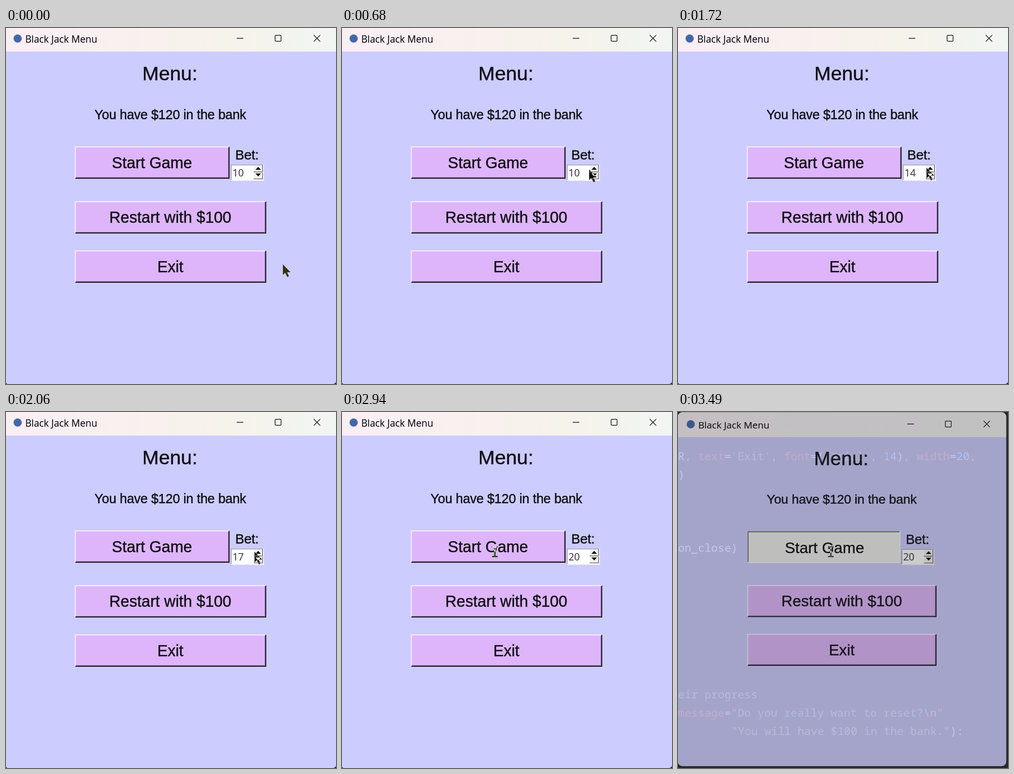
An HTML page for the animation above (3550 ms loop, 721x777 px).

```html
<!DOCTYPE html>
<html lang="en">
<head>
<meta charset="utf-8">
<title>Black Jack Menu</title>
<style>
  html, body { margin: 0; width: 100%; height: 100%; overflow: hidden; background: #292929; }
  svg { display: block; width: 721px; height: 777px; }
  text { font-family: "Liberation Sans", Arial, sans-serif; fill: #101016; stroke: #101016; stroke-width: .5; white-space: pre; }
  .mid { text-anchor: middle; }
  .ui { font-family: "Open Sans", "Noto Sans", sans-serif; stroke-width: .2; }
  #bet { fill: #3a3a4a; stroke: #3a3a4a; }
  #code text { font-family: "Noto Sans Mono", monospace; font-size: 24.15px; fill: #a9b7c6; stroke: none; }
  #code .arg { fill: #aa4926; }
  #code .str { fill: #6a8759; }
  #code .key { fill: #cc7832; }
  #code .num { fill: #6897bb; }
  #code .note { fill: #808080; }
  #pointer { mix-blend-mode: difference; }
</style>
</head>
<body>
<svg viewBox="0 0 721 777">
  <defs>
    <linearGradient id="active">
      <stop offset="0" stop-color="#faeef5"/>
      <stop offset=".35" stop-color="#f9f0ef"/>
      <stop offset=".65" stop-color="#f6f3ea"/>
      <stop offset="1" stop-color="#f1f5f3"/>
    </linearGradient>
    <linearGradient id="idle">
      <stop offset="0" stop-color="#f8eff5"/>
      <stop offset=".4" stop-color="#f4f1f5"/>
      <stop offset="1" stop-color="#f2f2f3"/>
    </linearGradient>
    <clipPath id="frame"><rect x="-3" y="-3.5" width="725.5" height="781" rx="10"/></clipPath>
  </defs>
  <rect width="721" height="777" fill="#292929"/>
  <g id="code" visibility="hidden">
    <text x="0" y="105">R<tspan class="key">, </tspan><tspan class="arg">text</tspan>=<tspan class="str">'Exit'</tspan><tspan class="key">, </tspan><tspan class="arg">font</tspan>=(<tspan class="str">'Arial'</tspan><tspan class="key">, </tspan><tspan class="num">14</tspan>)<tspan class="key">, </tspan><tspan class="arg">width</tspan>=<tspan class="num">20</tspan><tspan class="key">,</tspan></text>
    <text x="0" y="145">)</text>
    <text x="0" y="305">on_close)</text>
    <text x="0" y="625"><tspan class="note">eir progress</tspan></text>
    <text x="0" y="664.500"><tspan class="arg">message</tspan>=<tspan class="str">"Do you really want to reset?</tspan><tspan class="key">\n</tspan><tspan class="str">"</tspan></text>
    <text x="116.500" y="704.500"><tspan class="str">"You will have $100 in the bank."</tspan>):</text>
  </g>
  <g id="win">
    <g clip-path="url(#frame)">
      <rect x="-4" y="-4" width="730" height="785" fill="#ccccff"/>
      <rect id="bar" x="-4" y="-4" width="730" height="55.5"/>
      <circle cx="25.5" cy="23" r="9" fill="#4468a8"/>
      <text class="ui" x="42" y="32" font-size="21">Black Jack Menu</text>
      <g fill="none" stroke="#151515" stroke-width="1.5">
        <path d="M504 22.5h14.5M672.500 15.500l14 14m0-14l-14 14"/>
        <rect x="588" y="16" width="13" height="13" rx="2"/>
      </g>
      <text class="mid" x="358" y="113.500" font-size="43.3">Menu:</text>
      <text class="mid" x="359" y="198.500" font-size="28.6" letter-spacing="-.25">You have $120 in the bank</text>
      <g id="buttons"></g>
      <text class="mid" x="526.5" y="287.300" font-size="29.6" letter-spacing="-.3">Bet:</text>
      <rect x="491" y="298" width="72.5" height="35.5" fill="#f4f4fc"/>
      <path d="M492 332v-33h70" fill="none" stroke="#9a9aa8" stroke-width="1.6"/>
      <rect x="493" y="300" width="69" height="32" fill="#fff"/>
      <rect x="541" y="300" width="20" height="30" fill="#f2f2f2"/>
      <path d="M541 314.200h19.500V300M541 329.300h19.500V316" fill="none" stroke="#77777c" stroke-width="1.8"/>
      <path d="M545 309.500h12l-6-6.500zM545 317.500h12l-6 6.500z" fill="#0a0a0a"/>
      <text id="bet" class="ui" x="495" y="324" font-size="21.5"></text>
    </g>
  </g>
  <g id="pointer">
    <path id="arrow" d="M0 0V23L5 18.300L9.500 27.500L13.200 25.800L9 17H16.500Z" fill="#fff"/>
    <path id="beam" d="M-6-10.500h4.500L0-9L1.500-10.500h4.500M0-9V9M-6 10.500h4.500L0 9L1.500 10.500h4.500" fill="none" stroke="#fff" stroke-width="3"/>
  </g>
</svg>
<script>
const LOOP = 3550, TICK = 68.2;
const $ = id => document.getElementById(id);

// Two-tone bevel along the top/left and bottom/right edges
function button(label, x, y, w, h, down) {
  const edge = (i, width, color, far) => {
    const l = x + i, t = y + i, r = x + w - i, b = y + h - i;
    const d = far ? `M${l} ${b}H${r}V${t}` : `M${l} ${b}V${t}H${r}`;
    return `<path d="${d}" fill="none" stroke="${color}" stroke-width="${width}"/>`;
  };
  const shift = down ? 2 : 0;
  const edges = down
    ? edge(1.6, 2.4, "#77777a") + edge(1, 2, "#f8f8ff", true)
    : edge(2.8, 1.6, "#a583bb", true) + edge(1, 2, "#fbf4ff") + edge(1.1, 2.2, "#15121a", true);
  return `<rect x="${x}" y="${y}" width="${w}" height="${h}" fill="${down ? "#eeefec" : "#deb5fb"}"/>${edges}
    <text class="mid" x="${x + w / 2 + shift - .5}" y="${y + 47 + shift}" font-size="34.3">${label}</text>`;
}

const buttonSets = [false, true].map(down =>
  button("Start Game", 150.5, 258.5, 338, 70.5, down) +
  button("Restart with $100", 150.5, 378, 418, 70.5) +
  button("Exit", 150.5, 485.5, 418, 70.5));

// Pointer stops: tick, x, y
const stops = [
  [0, 605, 516], [8, 542, 313], [10, 540, 309], [16, 543, 305], [39, 543, 305],
  [40, 535, 320], [41, 470, 324], [42, 375, 312], [43, 334, 305], [60, 334, 305]
];

function pointerAt(k) {
  const i = stops.findIndex((s, n) => n && k <= s[0]);
  const a = stops[i - 1], b = stops[i];
  const u = (k - a[0]) / (b[0] - a[0]), e = u * u * (3 - 2 * u);
  return [a[1] + (b[1] - a[1]) * e, a[2] + (b[2] - a[2]) * e];
}

function betAt(k) {
  return k < 16 ? 10 : Math.min(20, 11 + Math.max(0, Math.floor((k - 18) / 2)));
}

let last = -1;
function draw(t) {
  const k = Math.floor((t + 2) / TICK);
  if (k === last) return;
  last = k;
  const [x, y] = pointerAt(k);
  const typing = k >= 40, closing = k >= 51;
  $("pointer").setAttribute("transform", `translate(${x} ${y})`);
  $("arrow").setAttribute("visibility", typing ? "hidden" : "visible");
  $("beam").setAttribute("visibility", typing ? "visible" : "hidden");
  $("bet").textContent = betAt(k);
  $("buttons").innerHTML = buttonSets[k >= 49 ? 1 : 0];
  $("bar").setAttribute("fill", k >= 50 ? "url(#idle)" : "url(#active)");
  $("code").setAttribute("visibility", closing ? "visible" : "hidden");
  $("win").setAttribute("opacity", closing ? .755 : 1);
  $("win").setAttribute("transform", closing ? "translate(2.6 4) scale(.989)" : "");
}

const start = performance.now();
function loop() {
  draw((performance.now() - start) % LOOP);
  requestAnimationFrame(loop);
}
loop();
</script>
</body>
</html>
```
